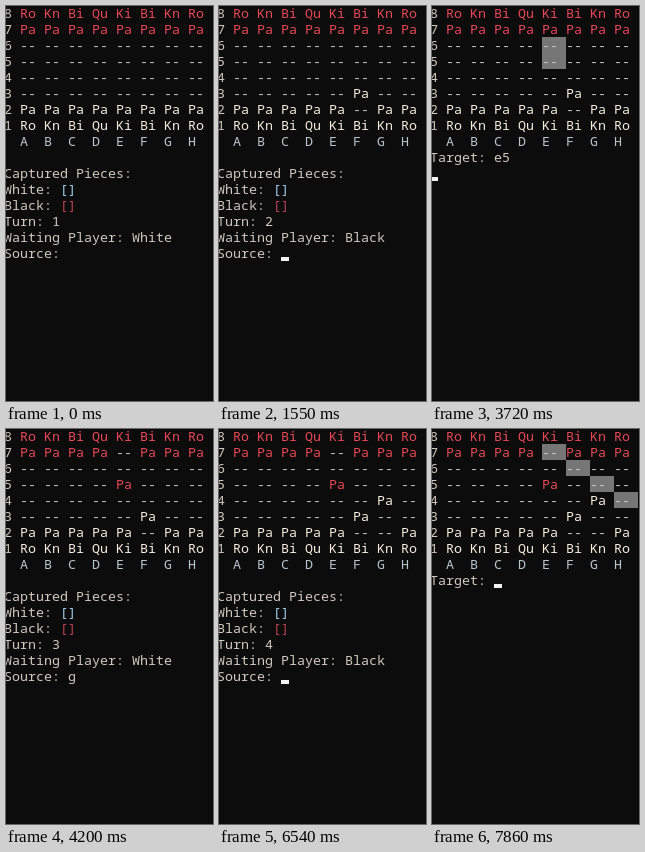
Recreate the animation shown at these times as an HTML page. Size 207 by 395 pixels, loop 8000 ms.

```html
<!DOCTYPE html>
<html lang="en">
<head>
<meta charset="utf-8">
<title>Console chess</title>
<style>
  html, body { margin: 0; width: 100%; height: 100%; overflow: hidden; background: #0c0c0c; }
  svg { display: block; }
  text { font: 13.333px "Noto Sans Mono", "DejaVu Sans Mono", monospace; white-space: pre; }
</style>
</head>
<body>
<svg id="console" width="207" height="395" viewBox="0 0 207 395"></svg>
<script>
const LOOP = 8000;
const CELL = { w: 8, h: 16, left: -2, top: -1 };
const COLOR = {
  text: '#d0c9be', dash: '#c8c2bc', white: '#f5ecdc', black: '#e74856', files: '#b9c4cb',
  whiteList: '#a5d2f0', blackList: '#bf4457', mark: '#767676', cursor: '#f2f2f2'
};
const BACK_RANK = ['Ro', 'Kn', 'Bi', 'Qu', 'Ki', 'Bi', 'Kn', 'Ro'];
const FILES = 'abcdefgh';
const MOVES = [['f2', 'f3'], ['e7', 'e5'], ['g2', 'g4']];
const REACHABLE = [['f3', 'f4'], ['e6', 'e5'], ['g3', 'g4'], ['e7', 'f6', 'g5', 'h4']];

// start ms, turn, screen, typed text, cursor
const TIMELINE = [
  [0, 1, 'source', '', 'off'],
  [320, 1, 'source', 'f', 'on'],
  [400, 1, 'source', 'f2', 'on'],
  [700, 1, 'clear', '', 16],
  [780, 1, 'target', '', 'on'],
  [1000, 1, 'target', 'f', 'off'],
  [1080, 1, 'target', 'f', 'on'],
  [1150, 1, 'target', 'f3', 'on'],
  [1550, 2, 'source', '', 'on'],
  [2180, 2, 'source', 'e', 'on'],
  [2330, 2, 'source', 'e7', 'on'],
  [2560, 2, 'clear', '', 16],
  [2640, 2, 'board', '', 'off'],
  [2710, 2, 'target', '', 'on'],
  [2940, 2, 'target', 'e', 'on'],
  [3030, 2, 'target', 'e5', 'on'],
  [3260, 2, 'target', 'e5', 'off'],
  [3720, 2, 'target', 'e5', 10],
  [3800, 2, 'clear', '', 10],
  [3880, 3, 'source', '', 'on'],
  [4200, 3, 'source', 'g', 'off'],
  [4280, 3, 'source', 'g', 'on'],
  [4430, 3, 'source', 'g2', 'on'],
  [4820, 3, 'source', 'g2', 'off'],
  [5360, 3, 'source', 'g2', 'on'],
  [5450, 3, 'target', '', 'on'],
  [6000, 3, 'target', '', 'off'],
  [6170, 3, 'target', 'g', 'off'],
  [6240, 3, 'target', 'g', 'on'],
  [6310, 3, 'target', 'g4', 'on'],
  [6460, 3, 'target', 'g4', 10],
  [6540, 4, 'source', '', 'on'],
  [7160, 4, 'source', 'd', 'on'],
  [7330, 4, 'source', 'd', 'off'],
  [7470, 4, 'source', 'd8', 'on'],
  [7710, 4, 'clear', '', 16],
  [7780, 4, 'board', '', 'off'],
  [7860, 4, 'target', '', 'on']
];

const xOf = col => CELL.left + col * CELL.w;
const yOf = row => CELL.top + row * CELL.h;
const print = (col, row, string, color = COLOR.text) =>
  `<text x="${xOf(col)}" y="${yOf(row) + 13}" fill="${color}">${string}</text>`;
const rect = (col, y, cols, height, color) =>
  `<rect x="${xOf(col)}" y="${y}" width="${cols * CELL.w}" height="${height}" fill="${color}"/>`;
const cursorAt = (col, row) => rect(col, yOf(row) + 12, 1, 4, COLOR.cursor);

function position(turn) {
  const squares = {};
  [...FILES].forEach((file, i) => {
    squares[file + 8] = [BACK_RANK[i], COLOR.black];
    squares[file + 7] = ['Pa', COLOR.black];
    squares[file + 2] = ['Pa', COLOR.white];
    squares[file + 1] = [BACK_RANK[i], COLOR.white];
  });
  for (const [from, to] of MOVES.slice(0, turn - 1)) {
    squares[to] = squares[from];
    delete squares[from];
  }
  return squares;
}

function board(turn, marked) {
  const squares = position(turn);
  let out = '';
  for (let row = 0; row < 8; row++) {
    const rank = 8 - row;
    out += print(0, row, rank);
    [...FILES].forEach((file, i) => {
      const col = 2 + 3 * i, square = file + rank;
      if (marked.includes(square)) out += rect(col, yOf(row), 3, CELL.h, COLOR.mark);
      out += print(col, row, ...(squares[square] || ['--', COLOR.dash]));
    });
  }
  [...FILES].forEach((file, i) => out += print(2 + 3 * i, 8, file.toUpperCase(), COLOR.files));
  return out;
}

function status(turn) {
  return print(0, 10, 'Captured Pieces:') +
    print(0, 11, 'White:') + print(7, 11, '[]', COLOR.whiteList) +
    print(0, 12, 'Black:') + print(7, 12, '[]', COLOR.blackList) +
    print(0, 13, 'Turn: ' + turn) +
    print(0, 14, 'Waiting Player: ' + (turn % 2 ? 'White' : 'Black'));
}

function draw([, turn, screen, typed, cursor]) {
  const isSource = screen === 'source';
  const promptRow = isSource ? 15 : 9;
  let out = '';
  if (screen !== 'clear') out += board(turn, isSource ? [] : REACHABLE[turn - 1]);
  if (isSource) out += status(turn);
  if (isSource || screen === 'target') {
    out += print(0, promptRow, isSource ? 'Source:' : 'Target:') + print(8, promptRow, typed);
  }
  if (cursor === 'on') out += cursorAt(8 + typed.length, promptRow);
  else if (cursor !== 'off') out += cursorAt(0, cursor);
  return out;
}

const stage = document.getElementById('console');
const start = performance.now();
let shown = null;

function update() {
  const time = Math.max(0, performance.now() - start) % LOOP;
  const state = TIMELINE.findLast(entry => entry[0] <= time);
  if (state !== shown) {
    stage.innerHTML = draw(state);
    shown = state;
  }
  requestAnimationFrame(update);
}
update();
</script>
</body>
</html>
```
